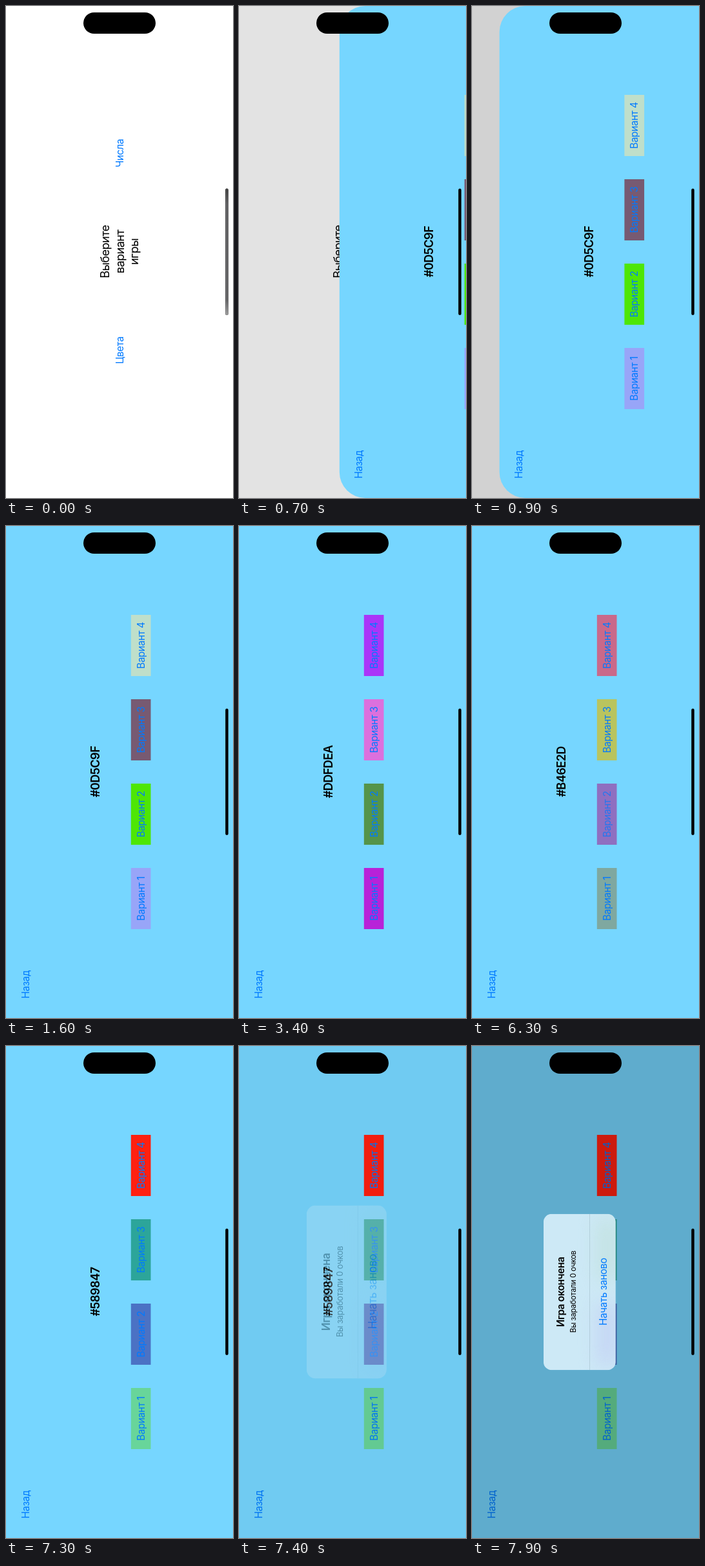
Recreate the animation shown at these times as an HTML page. Size 352 px wide and 764 px high, loop 8000 ms.

```html
<!DOCTYPE html>
<html lang="ru">
<head>
<meta charset="utf-8">
<title>Угадай цвет</title>
<style>
  html, body { margin: 0; width: 100%; height: 100%; overflow: hidden; background: #fff; }
  svg { display: block; width: 100%; height: 100%; }
  text { font: 15.3px Inter, "Noto Sans", sans-serif; letter-spacing: -.025em; text-anchor: middle; white-space: pre; }
  .big { font-size: 18.2px; letter-spacing: -.033em; }
  .bold { font-weight: 600; }
  .small { font-size: 11.65px; letter-spacing: -.02em; }
  .link { fill: #007aff; }
</style>
</head>
<body>
<svg viewBox="0 0 352 764" preserveAspectRatio="none">
  <defs>
    <linearGradient id="fadedBar" x1="0" y1="0" x2="0" y2="1">
      <stop offset="0" stop-color="#444"/>
      <stop offset=".12" stop-color="#646466"/>
      <stop offset=".88" stop-color="#68686a"/>
      <stop offset="1" stop-color="#a0a0a0"/>
    </linearGradient>
    <filter id="soft" x="-50%" y="-100%" width="200%" height="300%">
      <feGaussianBlur stdDeviation="14"/>
    </filter>
    <clipPath id="alertShape"><rect x="261" y="111" width="242" height="111.6" rx="12.5"/></clipPath>
  </defs>

  <!-- The phone lies on its side: everything in this group is laid out 764 x 352 -->
  <g transform="translate(0 764) rotate(-90)">
    <rect width="764" height="352" fill="#fff"/>
    <text class="big" x="382.5" y="159.8">Выберите</text>
    <text class="big" x="382.5" y="182.6">вариант</text>
    <text class="big" x="382.5" y="205.2">игры</text>
    <text class="link" x="229.5" y="181.7">Цвета</text>
    <text class="link" x="535.5" y="181.7">Числа</text>
    <rect id="menuDim" width="764" height="352" opacity="0"/>

    <g id="game">
      <rect id="sheet" width="764" height="420" fill="#76d6ff"/>
      <text class="link" x="52" y="35.7">Назад</text>
      <text id="code" class="big bold" x="382.5" y="145.2"></text>
      <g id="options"></g>
    </g>

    <rect id="gameDim" width="764" height="352" opacity="0"/>
    <g id="alert" opacity="0">
      <g clip-path="url(#alertShape)">
        <rect x="261" y="111" width="242" height="112" fill="#cde9f6"/>
        <g filter="url(#soft)" opacity=".7">
          <rect x="269" y="194" width="95" height="31" fill="#c2cdf4"/>
          <rect x="400" y="194" width="95" height="31" fill="#c0e0da"/>
        </g>
        <rect x="261" y="182.2" width="242" height=".7" fill="#a9c4d2"/>
      </g>
      <text class="bold" x="382" y="143.5">Игра окончена</text>
      <text class="small" x="382.5" y="161.3">Вы заработали 0 очков</text>
      <text class="link" x="382.5" y="208.8">Начать заново</text>
    </g>
  </g>

  <rect x="120" y="10" width="112" height="33" rx="16.5"/>
  <rect x="340.2" y="283.5" width="4.5" height="196.5" rx="2.25"/>
  <rect id="paleBar" x="340.2" y="283.5" width="4.5" height="196.5" rx="2.25" fill="url(#fadedBar)"/>
</svg>

<script>
  const LOOP = 8000, STEP = 100;
  const SLIDE_START = 490, SLIDE_END = 1300, ALERT_START = 7310;

  // Each round: start time, colour code, fills of options 1 to 4
  const rounds = [
    [0, '#0D5C9F', '#98a5f8', '#4ee605', '#775a72', '#bfdfca'],
    [2700, '#DDFDEA', '#b822d8', '#55944a', '#dc70dd', '#aa35f8'],
    [4100, '#09FEC2', '#a5f92e', '#c4e0d8', '#e2796c', '#ab3538'],
    [5300, '#B46E2D', '#7fa8a0', '#8f6fc0', '#b9c45e', '#c9698a'],
    [6400, '#589847', '#68d59a', '#4b72c4', '#2ca59a', '#ff2010']
  ];
  const presses = [2600, 4000, 5200, 6300, 7200];

  const $ = id => document.getElementById(id);
  const clamp = v => Math.max(0, Math.min(1, v));
  const set = (node, attrs) => {
    for (const key in attrs) node.setAttribute(key, attrs[key]);
    return node;
  };
  const add = (parent, tag, attrs) =>
    parent.appendChild(set(document.createElementNS('http://www.w3.org/2000/svg', tag), attrs));

  // Critically damped spring from 0 to 1
  const spring = (ms, rate) => {
    const x = Math.max(0, ms) / 1000 * rate;
    return 1 - (1 + x) * Math.exp(-x);
  };

  const options = [1, 2, 3, 4].map(n => {
    const x = 138 + (n - 1) * 131;
    const box = add($('options'), 'rect', { x, y: 193.8, width: 95, height: 30.7 });
    const label = add($('options'), 'text', { x: x + 47.5, y: 214.8, class: 'link' });
    label.textContent = 'Вариант ' + n;
    return { box, label };
  });

  function render(t) {
    const slide = t > SLIDE_END ? 1 : spring(t - SLIDE_START, 8.9);
    set($('game'), { transform: `translate(0 ${352 * (1 - slide)})` });
    set($('sheet'), { rx: slide < 1 ? 40 : 0 });
    set($('menuDim'), { opacity: 0.2 * slide });
    set($('paleBar'), { opacity: 1 - clamp((t - 400) / 300) });

    const [, code, ...fills] = rounds.filter(r => r[0] <= t).pop();
    $('code').textContent = code;
    options.forEach((o, i) => set(o.box, { fill: fills[i] }));
    const pressed = presses.some(p => t >= p && t < p + STEP);
    set(options[1].label, { opacity: pressed ? 0.75 : 1 });

    const shown = spring(t - ALERT_START, 11);
    const scale = 1.15 - 0.15 * shown;
    set($('gameDim'), { opacity: 0.2 * shown });
    set($('alert'), {
      opacity: clamp(shown * 1.05),
      transform: `translate(382 167) scale(${scale}) translate(-382 -167)`
    });
  }

  const start = performance.now();
  function tick() {
    const t = (performance.now() - start) % LOOP;
    render(Math.floor(t / STEP) * STEP);
    requestAnimationFrame(tick);
  }
  tick();
</script>
</body>
</html>
```
